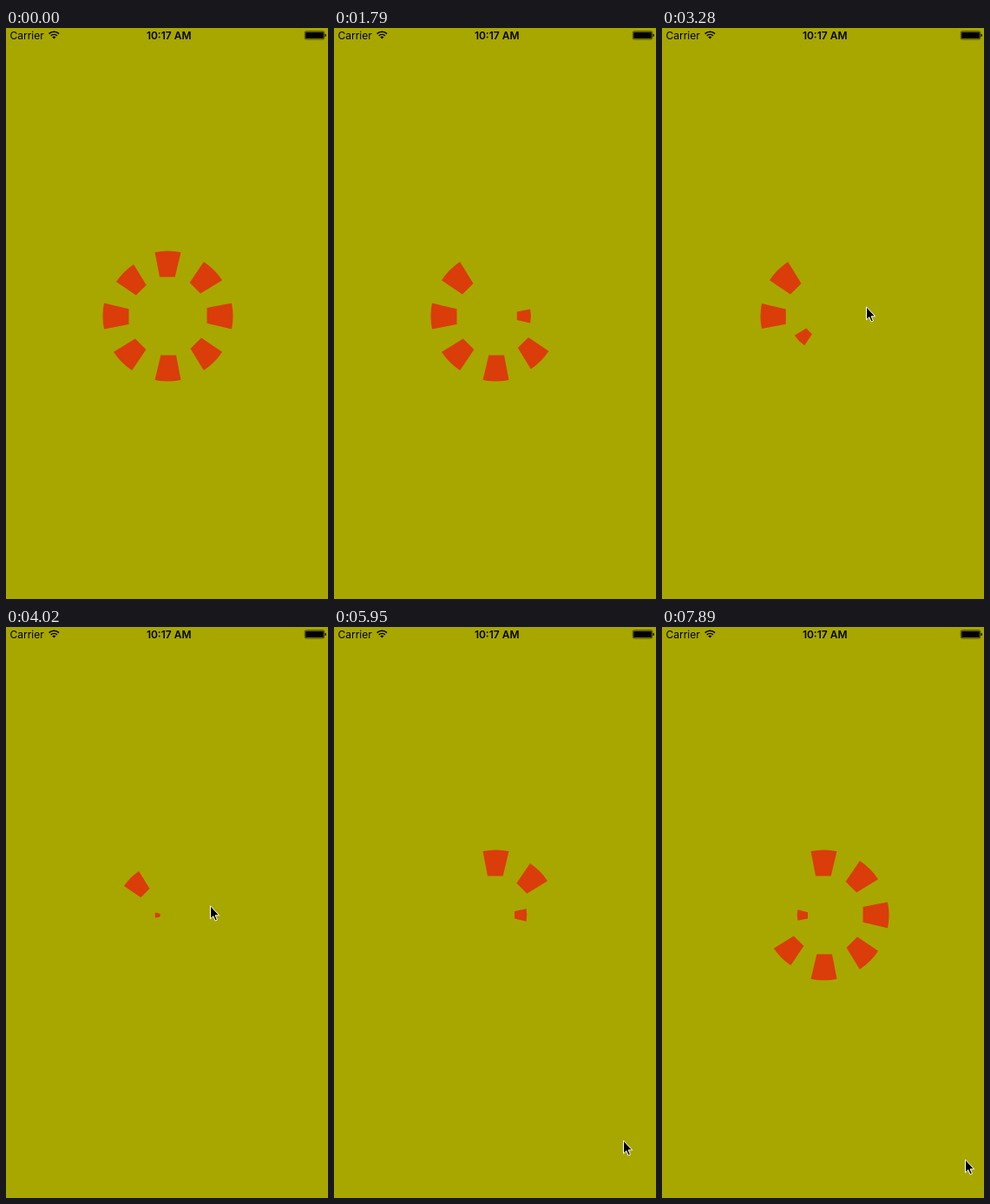
Recreate the animation shown at these times as an HTML page. Size 371 by 657 pixels, loop 8 s.

```html
<!DOCTYPE html>
<html lang="en">
<head>
<meta charset="utf-8">
<title>Segment spinner</title>
<style>
  html, body { margin: 0; width: 100%; height: 100%; overflow: hidden; background: #a8a700; }
  svg { display: block; width: 371px; height: 657px; }
  text { font: 12px Inter, "Open Sans", sans-serif; }
  .time { font-weight: 600; text-anchor: middle; }
  #ring { fill: #da3c0a; }
</style>
</head>
<body>
<svg viewBox="0 0 371 657">
  <text x="4.5" y="13">Carrier</text>
  <g fill="none" stroke="#000" stroke-width="1.6">
    <path d="M49.6 6.6a8.2 8.2 0 0 1 11.4 0M51.7 8.9a5.2 5.2 0 0 1 7.2 0"/>
    <path d="M55.3 12.6l-2-2.1a2.9 2.9 0 0 1 4 0z" fill="#000" stroke="none"/>
  </g>
  <text class="time" x="187.7" y="13">10:17 AM</text>
  <rect x="344.3" y="3.8" width="22.4" height="9.2" rx="1.5" fill="none" stroke="#000" stroke-width=".6"/>
  <rect x="345.2" y="4.7" width="20.6" height="7.4" rx=".7"/>
  <path d="M367.4 6.8q1.6.4 1.6 1.6t-1.6 1.6z"/>
  <g id="ring" transform="translate(186.5 331.5)"></g>
  <path id="cursor" d="M.5 .8V15.8L3.8 12.7 6.1 18 8.4 17 6.1 11.8H10.6Z" stroke="#fff" stroke-width="1"/>
</svg>
<script>
  const LOOP = 8000, TICK = 148.7, TICK_POSE = 148.9;
  const COUNT = 8, DURATION = 993, STAGGER = 496.5;
  const HIDE_START = 172;
  const HALF_CYCLE = (COUNT - 1) * STAGGER + DURATION;
  const WEDGE = "M-15-73.5A75 75 0 0 1 15-73.5L8.2-45H-9.5Z";

  // Cursor stops: time, x, y
  const STOPS = [
    [2970, 357, 262], [3130, 290, 296], [3270, 235, 320], [4460, 235, 320],
    [4615, 235, 475], [4910, 317, 566], [5650, 317, 566], [5807, 327, 586],
    [5955, 333, 590], [6250, 349, 612], [LOOP, 349, 612]
  ];

  const ring = document.getElementById("ring");
  const cursor = document.getElementById("cursor");
  const wedges = Array.from({ length: COUNT }, () => {
    const path = document.createElementNS(ring.namespaceURI, "path");
    path.setAttribute("d", WEDGE);
    return ring.appendChild(path);
  });

  // cubic-bezier(0, 0, .58, 1)
  function easeOut(x) {
    if (x <= 0) return 0;
    if (x >= 1) return 1;
    let low = 0, high = 1;
    for (let n = 0; n < 20; n++) {
      const mid = (low + high) / 2;
      if (mid * mid * (1.74 - 0.74 * mid) < x) low = mid; else high = mid;
    }
    return low * low * (3 - 2 * low);
  }

  function wedgeScale(time, index) {
    const age = time - HIDE_START - index * STAGGER;
    if (age < 0) return easeOut((age + HALF_CYCLE) / DURATION);
    if (age < HALF_CYCLE) return easeOut(1 - age / DURATION);
    return easeOut((age - HALF_CYCLE) / DURATION);
  }

  function placeCursor(time) {
    const next = STOPS.findIndex(stop => stop[0] > time);
    cursor.style.display = next > 0 ? "" : "none";
    if (next < 1) return;
    const [t0, x0, y0] = STOPS[next - 1], [t1, x1, y1] = STOPS[next];
    const part = (time - t0) / (t1 - t0);
    cursor.setAttribute("transform",
      `translate(${x0 + (x1 - x0) * part} ${y0 + (y1 - y0) * part})`);
  }

  function render(time) {
    wedges.forEach((wedge, i) => {
      const scale = wedgeScale(time, i);
      wedge.style.display = scale > 0 ? "" : "none";
      wedge.setAttribute("transform", `rotate(${i * 360 / COUNT}) scale(${scale})`);
    });
    placeCursor(time);
  }

  const start = performance.now();
  function frame() {
    const elapsed = (performance.now() - start) % LOOP;
    // The picture advances in discrete ticks.
    render(Math.floor(elapsed / TICK) * TICK_POSE);
    requestAnimationFrame(frame);
  }
  frame();
</script>
</body>
</html>
```
